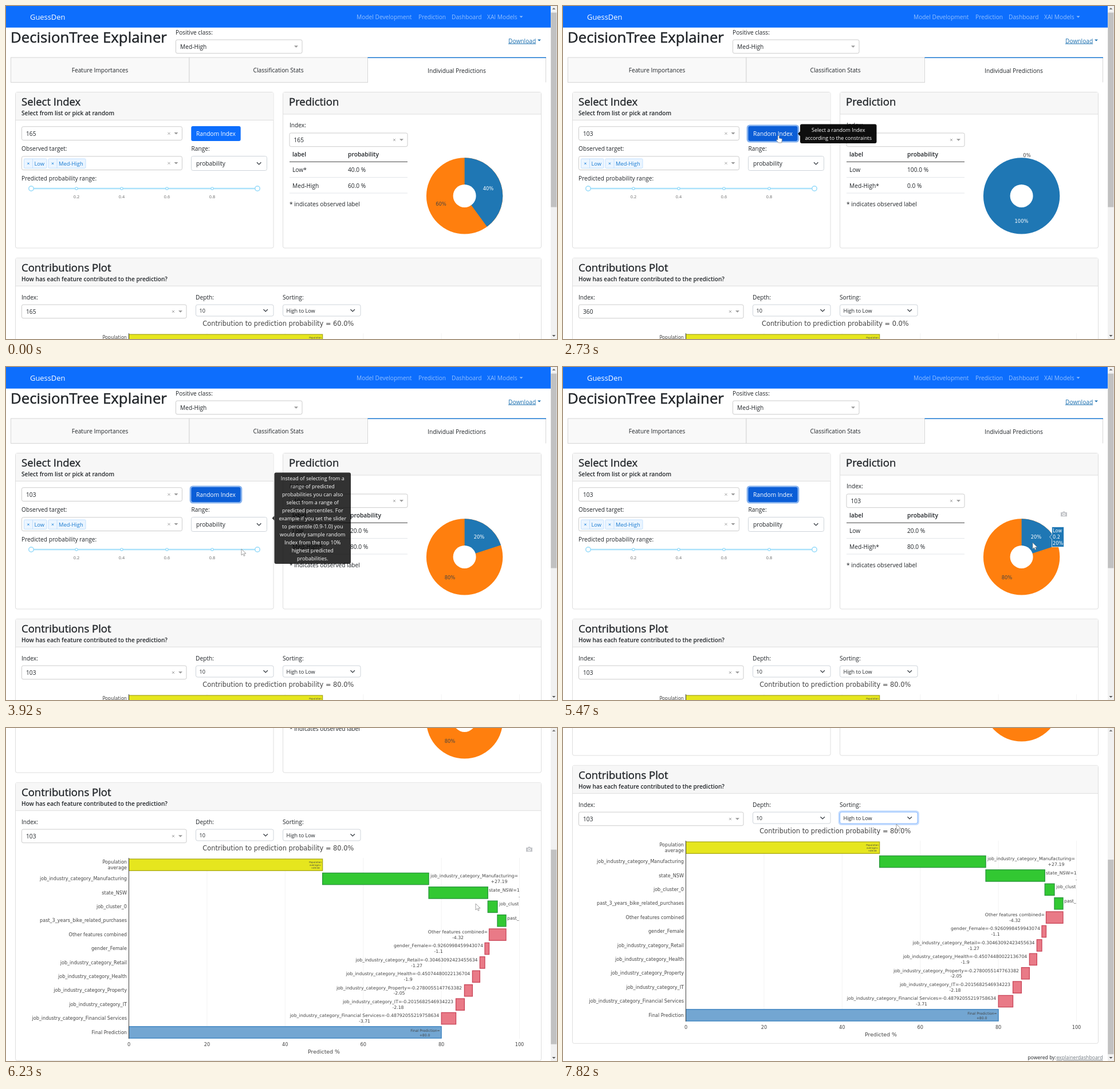
An HTML page for the animation above (8 s loop, 962x582 px).

```html
<!DOCTYPE html>
<html lang="en">
<head>
<meta charset="utf-8">
<title>Explainer dashboard</title>
<style>
  html, body { margin: 0; width: 100%; height: 100%; overflow: hidden; background: #fff; }
  svg { display: block; width: 100%; height: 100%; }
  text { font-family: "Open Sans", "Noto Sans", sans-serif; fill: #212529; white-space: pre; }
  .plot { font-family: "DejaVu Sans", Verdana, sans-serif; fill: #444; }
  .mid { text-anchor: middle; }
  .end { text-anchor: end; }
  .semi { font-weight: 600; }
  .head { font-weight: 500; stroke: #212529; stroke-width: .02em; }
</style>
</head>
<body>
<svg id="stage" viewBox="0 0 962 582"></svg>
<script>
const DURATION = 8000;
const stage = document.getElementById("stage");

// Each entry changes part of the state at its time and holds until the next.
const timeline = [
  [0, { index: 165, shown: 165, low: 40, star: "Low", chance: "60.0", scroll: 0 }],
  [210, { cursor: [690, 120] }],
  [400, { cursor: [620, 150] }],
  [600, { cursor: [520, 195] }],
  [790, { cursor: [425, 226] }],
  [980, { cursor: [372, 226], hand: true, hover: true }],
  [1180, { buttonTip: 0.94 }],
  [1370, { focus: true }],
  [1570, { index: 360 }],
  [1970, { shown: 360 }],
  [2170, { low: 100, star: "Med-High" }],
  [2360, { chance: "0.0" }],
  [2730, { index: 103 }],
  [2930, { shown: 103 }],
  [3110, { low: 20 }],
  [3330, { chance: "80.0" }],
  [3710, { cursor: [395, 275], hand: false, buttonTip: 0, rangeTip: 0.9 }],
  [3920, { cursor: [411, 318], rangeTip: 0.8 }],
  [4110, { cursor: [440, 350], rangeTip: 0 }],
  [4300, { cursor: [470, 368] }],
  [4700, { cursor: [560, 360] }],
  [4890, { cursor: [650, 345] }],
  [5080, { cursor: [740, 325] }],
  [5270, { cursor: [800, 312], pieCamera: true }],
  [5470, { cursor: [820, 307], pieHover: true }],
  [5660, { scroll: 150, pieCamera: false, pieHover: false }],
  [5860, { scroll: 250, plotCamera: true }],
  [6050, { scroll: 310 }],
  [6230, { scroll: 345 }],
  [6440, { scroll: 375 }],
  [6830, { cursor: null }],
  [7240, { cursor: [588, 156], plotCamera: false }],
  [7620, { sortFocus: true }],
  [7820, { cursor: [582, 168] }],
];

const text = (x, y, str, size = 10.2, cls = "", attrs = "") =>
  `<text x="${x}" y="${y}" font-size="${size}" class="${cls}" ${attrs}>${str}</text>`;
const rect = (x, y, w, h, fill, stroke = "none", r = 0, attrs = "") =>
  `<rect x="${x}" y="${y}" width="${w}" height="${h}" rx="${r}" fill="${fill}" stroke="${stroke}" ${attrs}/>`;
const path = (d, fill, stroke = "none", attrs = "") =>
  `<path d="${d}" fill="${fill}" stroke="${stroke}" ${attrs}/>`;
const circle = (x, y, r, fill, stroke = "none", attrs = "") =>
  `<circle cx="${x}" cy="${y}" r="${r}" fill="${fill}" stroke="${stroke}" ${attrs}/>`;
const paint = color => `style="fill:${color}"`;

const caret = (x, y, color = "#999", r = 3.5) =>
  path(`M${x - r} ${y - r / 2}h${2 * r}l${-r} ${r}z`, color);
const cross = (x, y, color = "#999", r = 2) =>
  path(`M${x - r} ${y - r}l${2 * r} ${2 * r}m0 ${-2 * r}l${-2 * r} ${2 * r}`, "none", color, 'stroke-width=".9"');

function dropdown(x, y, w, value, clearable = true) {
  const right = x + w - 10.5, mid = y + 12;
  return rect(x, y, w, 23.7, "#fff", "#ccc", 2.7) + text(x + 7.5, y + 16, value) +
    caret(right, mid) + (clearable ? cross(right - 12.5, mid) : "");
}

function nativeSelect(x, y, w, h, value, size, focused) {
  const ring = focused ? rect(x - 1.5, y - 1.5, w + 3, h + 3, "none", "#c2dbfe", 4, 'stroke-width="2.7"') : "";
  return ring + rect(x, y, w, h, "#fff", focused ? "#86b7fe" : "#ced4da", 3) +
    text(x + (size > 10 ? 8.5 : 6), y + h / 2 + 3.5, value, size) +
    path(`M${x + w - 17.5} ${y + h / 2 - 1.7}l3.7 3.6 3.7-3.6`, "none", "#343a40", 'stroke-width="1.3"');
}

const card = (x, y, w, h, head, title, subtitle = "") =>
  rect(x, y, w, h, "#fff", "#dedede", 3) + rect(x + .5, y + .5, w - 1, head, "#f7f7f7") +
  path(`M${x} ${y + head + .5}h${w}`, "none", "#dedede") +
  text(x + 10.5, y + 23.8, title, 18.5, "head") + text(x + 10.5, y + 40.5, subtitle, 10.15, "semi");

const camera = (x, y) =>
  path(`M${x - 5.5} ${y - 3}h3l1-1.6h3l1 1.6h3v7.3h-11z`, "#c3c5c9") +
  circle(x, y + .5, 2.5, "#fff") + circle(x, y + .5, 1.4, "#c3c5c9");

function tooltip(x, y, w, h, lines, opacity) {
  if (!opacity) return "";
  const mid = y + h / 2;
  return `<g opacity="${opacity}">` + rect(x, y, w, h, "#000", "none", 3) +
    path(`M${x} ${mid - 4}l-4 4 4 4z`, "#000") +
    lines.map((line, i) => text(x + w / 2, y + 13.3 + 14 * i, line, 9, "mid", paint("#fff"))).join("") + "</g>";
}

function header() {
  const links = [[612, "Model Development"], [720, "Prediction"], [778, "Dashboard"], [840, "XAI Models"]];
  const tabs = [[164, "Feature Importances"], [475.5, "Classification Stats"]];
  return rect(0, 0, 951, 37.7, "#0d6efd") + text(42, 24, "GuessDen", 12.9, "", paint("#fff")) +
    links.map(([x, s]) => text(x, 23, s, 10.2, "", paint("#92bffe"))).join("") + caret(899.5, 19, "#92bffe", 3) +
    text(8, 64, "DecisionTree Explainer", 25.8, "head") +
    text(296, 50, "Positive class:") + dropdown(296.5, 59, 220.5, "Med-High", false) +
    text(877, 64.5, "Download", 10.2, "", 'style="fill:#1b70b0;text-decoration:underline"') + caret(931, 60, "#1b70b0", 3) +
    tabs.map(([x, s], i) => rect(8.5 + 311.5 * i, 90, 311.5, 43.5, "#f9f9f9", "#d6d6d6") +
      text(x, 116, s, 10.2, "mid")).join("") +
    path("M942.5 90v43.5", "none", "#d6d6d6") + rect(631.5, 89.5, 311.5, 1.5, "#1a78d2") +
    text(787, 117, "Individual Predictions", 10.2, "mid");
}

function selectCard(s) {
  const tag = (x, w, label) => rect(x, 267, w, 16.5, "#ebf5ff", "#c2e0ff", 1.5) +
    path(`M${x + 15} 267v16.5`, "none", "#c2e0ff") + cross(x + 7.5, 275.3, "#0878d8", 1.6) +
    text(x + 18, 279, label, 9.4, "", paint("#1779d0"));
  const stops = [.2, .4, .6, .8].map(v => [44 + 395 * v, v]);
  return card(16.5, 150.5, 450.5, 272.5, 48.5, "Select Index", "Select from list or pick at random") +
    dropdown(27.5, 210.8, 280, s.index) +
    (s.focus ? rect(322, 208.8, 89, 28.4, "none", "#86b2ee", 4, 'stroke-width="2.7"') : "") +
    rect(323.3, 210.1, 86.4, 25.8, s.hover ? "#0b5ed7" : "#0d6efd", "none", 3) +
    text(366.5, 227, "Random Index", 10.2, "mid", paint("#fff")) +
    text(27, 253, "Observed target:") + dropdown(27.5, 262.8, 280, "") +
    tag(31.5, 39.5, "Low") + tag(74, 65, "Med-High") +
    text(323.5, 253, "Range:") + nativeSelect(323.5, 262.5, 132, 25, "probability", 10.2) +
    text(27, 305, "Predicted probability range:") +
    path("M44 319h395", "none", "#abe2fb", 'stroke-width="2.7"') +
    stops.map(([x, v]) => circle(x, 319, 2.1, "#fff", "#96dbfa", 'stroke-width="1.3"') +
      text(x, 335.7, v, 7.3, "mid", paint("#666"))).join("") +
    [44, 439].map(x => circle(x, 319, 4.2, "#fff", "#96dbfa", 'stroke-width="1.5"')).join("");
}

function pie(low) {
  const cx = 800.6, cy = 331.9, r = 66.7, angle = low / 100 * 2 * Math.PI;
  const blue = "#1f77b4", orange = "#ff7f0e";
  const labels = {
    40: [[842, 322, "#fff"], [759.5, 349, "#444"]],
    100: [[800.5, 379, "#fff"], [810, 264, "#444"]],
    20: [[826, 300, "#fff"], [775, 371, "#444"]],
  }[low];
  const slice = low == 100 ? "" :
    path(`M${cx} ${cy}V${cy - r}A${r} ${r} 0 0 1 ${cx + r * Math.sin(angle)} ${cy - r * Math.cos(angle)}z`, blue);
  return circle(cx, cy, r, low == 100 ? blue : orange) + slice + circle(cx, cy, 20, "#fff") +
    labels.map(([x, y, color], i) => text(x, y, (i ? 100 - low : low) + "%", 8.4, "plot mid", paint(color))).join("");
}

function predictionCard(s) {
  const column = s.low == 40 ? 597 : 601;
  const row = (y, label, value) => text(500, y, label + (s.star == label ? "*" : "")) +
    text(column, y, value.toFixed(1) + " %") + path(`M495 ${y + 9.5}h206`, "none", "#e3e6e9");
  const hover = path("M849.5 297l4-4v-13.5h21v35h-21v-13.5z", "#1f77b4", "#fff", 'stroke-width=".7"') +
    ["Low", "0.2", "20%"].map((line, i) => text(855, 289 + 11 * i, line, 8.2, "plot", paint("#fff"))).join("");
  return card(483.5, 150.5, 451, 272.5, 38, "Prediction") +
    text(495, 212, "Index:") + dropdown(495, 222, 206, s.shown) +
    text(500, 263, "label", 10.3, "semi") + text(column, 263, "probability", 10.3, "semi") +
    path("M495 272.3h206", "none", "#444") +
    row(290, "Low", s.low) + row(317.5, "Med-High", 100 - s.low) +
    text(495, 350, "* indicates observed label") +
    pie(s.low) + (s.pieCamera ? camera(874.5, 257) : "") + (s.pieHover ? hover : "");
}

// Feature, change, annotation, annotation x, second line, its x
const features = [
  ["job_industry_category_Manufacturing", 27.19, "job_industry_category_Manufacturing=", 741, "+27.19", 861],
  ["state_NSW", 15.13, "state_NSW=1", 843, ".", 896],
  ["job_cluster_0", 2.45, "job_clust", 861],
  ["past_3_years_bike_related_purchases", 2.2, "past_", 875],
  ["Other features combined", -4.32, "Other features combined=", 789],
  ["gender_Female", -1.1, "gender_Female=-0.9260998459943074", 755],
  ["job_industry_category_Retail", -1.27, "job_industry_category_Retail=-0.30463092423455634", 717],
  ["job_industry_category_Health", -1.9, "job_industry_category_Health=-0.45074480022136704", 702],
  ["job_industry_category_Property", -2.05, "job_industry_category_Property=-0.2780055147763382", 686.5],
  ["job_industry_category_IT", -2.18, "job_industry_category_IT=-0.2015682546934223", 684.5],
  ["job_industry_category_Financial Services", -3.71, "job_industry_category_Financial Services=-0.48792055219758634", 626],
];

function waterfall() {
  const px = value => 214.5 + 6.82 * value;
  const rowY = i => 584 + 24.4 * i;
  const bar = (i, from, to, fill, stroke) =>
    rect(px(Math.min(from, to)), rowY(i) - 10, 6.82 * Math.abs(to - from), 20.3, fill, stroke, 0, 'stroke-width="1.3"');
  const label = (y, str) => text(211, y + 2.8, str, 8.1, "plot end");
  let total = 49.58;
  let out = [20, 40, 60, 80, 100].map(v => path(`M${px(v)} 572v316`, "none", "#eee", 'stroke-width=".7"')).join("");
  out += bar(0, 0, total, "#e6e61e", "#a9a91c") + label(579, "Population") + label(589.5, "average") +
    ["Population", "average=", "+49.58"].map((line, i) => text(540, 580.7 + 5.2 * i, line, 4.1, "plot mid")).join("");
  features.forEach(([name, change, note, noteX, second, secondX], k) => {
    const y = rowY(k + 1), gain = change > 0;
    out += bar(k + 1, total, total + change, gain ? "#32c832" : "#e97a87", gain ? "#28963a" : "#c94558") + label(y, name) +
      text(noteX, y - 2, note, 7.8, gain ? "plot" : "plot mid") +
      text(secondX || noteX, y + 7.8, gain ? second || "" : change, 7.8, "plot mid");
    total += change;
  });
  return out + bar(12, 0, 80, "#73a6d2", "#3780bf") + label(rowY(12), "Final Prediction") +
    text(732, 875.5, "Final Prediction=", 6.1, "plot mid") + text(731, 883.5, "+80.0", 6.1, "plot mid") +
    path("M214.5 572v316", "none", "#444") +
    [0, 20, 40, 60, 80, 100].map(v => text(px(v), 901, v, 8.2, "plot mid")).join("") +
    text(555, 914, "Predicted %", 9.4, "plot mid");
}

function contributionsCard(s) {
  return card(16.5, 440.3, 918, 486, 48.5, "Contributions Plot", "How has each feature contributed to the prediction?") +
    text(27, 513, "Index:") + dropdown(27.5, 522, 287.5, s.shown) +
    text(331, 513, "Depth:") + nativeSelect(331.5, 522, 135.5, 20, "10", 9.1) +
    text(483, 513, "Sorting:") + nativeSelect(483.5, 522, 135.5, 20, "High to Low", 9.1, s.sortFocus) +
    text(475.3, 559, `Contribution to prediction probability = ${s.chance}%`, 11.4, "plot mid") +
    (s.plotCamera ? camera(913.5, 557) : "") + waterfall() +
    text(861, 954, "powered by:", 8.7, "end") +
    text(942.5, 954, "explainerdashboard", 8.7, "end", 'style="fill:#6c757d;text-decoration:underline"');
}

const scrollbar = scroll => rect(951, 0, 11, 582, "#f1f1f1") +
  rect(951.3, 11.5 + scroll * .583, 10, 340, "#c1c1c1") +
  path("M953.5 6l3-3 3 3z", "#777") + path("M953.5 575l3 3 3-3z", "#555");

function pointer({ cursor, hand }) {
  if (!cursor) return "";
  const shape = hand
    ? "M3 8V1.5a1.2 1.2 0 0 1 2.4 0V5l4.2 1q1 .4 .9 1.6l-.8 5.4H4.2L.4 8.6q.8-1.4 2.6-.6z"
    : "M0 0v11l2.6-2.4 1.7 3.8 1.8-.8-1.7-3.6H8z";
  return `<g transform="translate(${cursor})">` + path(shape, "#fff", "#777", 'stroke-width=".7"') + "</g>";
}

const buttonLines = ["Select a random Index", "according to the constraints"];
const rangeLines = ["Instead of selecting from a", "range of predicted", "probabilities you can also",
  "select from a range of", "predicted percentiles. For", "example if you set the slider", "to percentile (0.9-1.0) you",
  "would only sample random", "Index from the top 10%", "highest predicted", "probabilities."];

const render = s => `<g transform="translate(0 ${-s.scroll})">` +
  header() + selectCard(s) + predictionCard(s) + contributionsCard(s) + "</g>" +
  tooltip(414, 206.5, 133.5, 33.5, buttonLines, s.buttonTip) +
  tooltip(468.5, 184.5, 133.5, 159.5, rangeLines, s.rangeTip) +
  scrollbar(s.scroll) + pointer(s);

let drawn = -1;
const start = performance.now();
function frame() {
  const time = (performance.now() - start) % DURATION;
  const passed = timeline.filter(([at]) => at <= time);
  if (passed.length !== drawn) {
    drawn = passed.length;
    stage.innerHTML = render(Object.assign({}, ...passed.map(([, change]) => change)));
  }
  requestAnimationFrame(frame);
}
frame();
</script>
</body>
</html>
```
